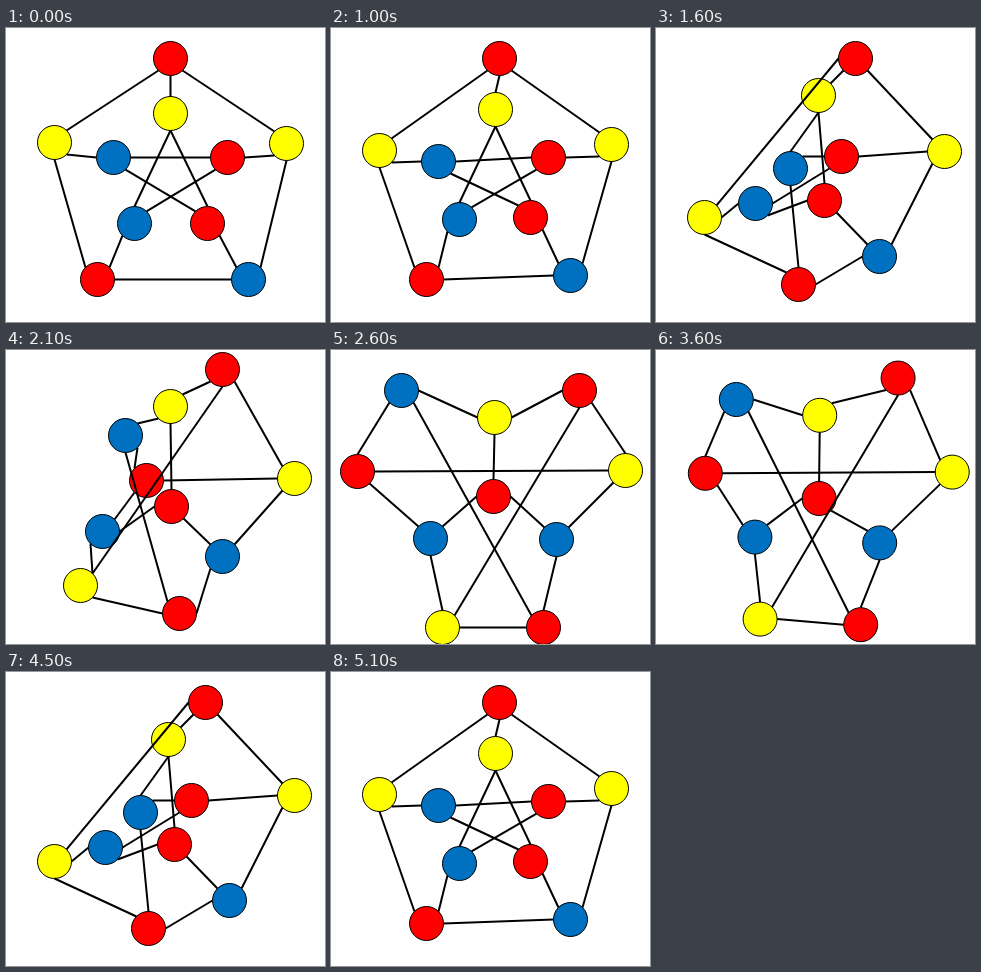
Animation, 319 px wide and 294 px high, one loop 5.2 s. Source, as an HTML page:

```html
<!DOCTYPE html>
<html lang="en">
<head>
<meta charset="utf-8">
<title>Ten-node graph morph</title>
<style>
  html, body { margin: 0; width: 100%; height: 100%; overflow: hidden; background: #fff; }
  svg { display: block; width: 100%; height: 100%; }
  circle { stroke: #000; stroke-width: 1; }
  line { stroke: #000; stroke-width: 2; }
</style>
</head>
<body>
<svg viewBox="0 0 319 294"></svg>
<script>
const RED = '#ff0000', YELLOW = '#ffff00', BLUE = '#0070c0';
const RADIUS = 17, STEP = 100, LOOP = 5200, LAST = 17;

// Steps at which the poses below are reached.
const poseSteps = [0, 1, 7, 12, LAST];

// Node path: x,y per pose; bends bow a path sideways between two poses.
const nodes = {
  top:    { fill: RED,    path: '164,30 168,30 199,30 216,19 248,40', bendY: [0, 0, 0, -14] },
  left:   { fill: YELLOW, path: '48,114 48,122 48,189 74,235 111,277' },
  right:  { fill: YELLOW, path: '280,115 280,116 288,123 288,128 294,120', bendX: [0, -4, 10, 5] },
  footL:  { fill: RED,    path: '91,251 95,251 142,256 173,263 212,277' },
  footR:  { fill: BLUE,   path: '242,251 239,247 223,228 216,206 225,189' },
  inTop:  { fill: YELLOW, path: '164,85 164,81 162,67 164,56 163,67' },
  inLeft: { fill: BLUE,   path: '107,129 107,133 99,175 96,181 99,188' },
  inRight:{ fill: RED,    path: '221,129 217,129 185,128 140,130 26,121' },
  inFootL:{ fill: BLUE,   path: '128,195 128,191 134,140 119,85 70,40' },
  inFootR:{ fill: RED,    path: '201,195 199,189 168,172 165,156 162,146' }
};

// Each edge: its two nodes and, per pose, the rim ports it joins.
// Ports count eighths of a turn clockwise from the right.
const edges = [
  'top left 37 37 47 27 27',
  'top right 15 15 15 15 16',
  'left footL 25 25 25 14 04',
  'right footR 27 27 37 37 37',
  'footL footR 04 04 04 03 62',
  'top inTop 26 26 37 37 40',
  'left inLeft 14 14 04 73 62',
  'right inRight 30 30 40 40 40',
  'footL inFootL 73 73 62 52 51',
  'footR inFootR 51 51 51 51 50',
  'inTop inFootL 26 26 26 37 40',
  'inTop inFootR 26 26 26 26 26',
  'inLeft inRight 04 04 03 73 51',
  'inLeft inFootR 15 15 14 04 74',
  'inRight inFootL 37 37 47 51 63'
].map(text => {
  const [from, to, ...ports] = text.split(' ');
  return { from: nodes[from], to: nodes[to], ports };
});

const svg = document.querySelector('svg');
const add = (tag, attrs = {}) => {
  const el = document.createElementNS(svg.namespaceURI, tag);
  set(el, attrs);
  return svg.appendChild(el);
};
function set(el, attrs) {
  for (const name in attrs) el.setAttribute(name, attrs[name]);
}

for (const node of Object.values(nodes)) {
  node.points = node.path.split(' ').map(p => p.split(',').map(Number));
  node.el = add('circle', { r: RADIUS, fill: node.fill });
}
for (const edge of edges) edge.el = add('line');

function placeNode(node, leg, part) {
  const [a, b] = [node.points[leg], node.points[leg + 1]];
  const bow = Math.sin(Math.PI * part);
  const at = (axis, bend) =>
    a[axis] + (b[axis] - a[axis]) * part + (bend ? bend[leg] * bow : 0) + 0.5;
  node.x = at(0, node.bendX);
  node.y = at(1, node.bendY);
  set(node.el, { cx: node.x, cy: node.y });
}

function port(node, index) {
  const angle = index * Math.PI / 4;
  return [node.x + RADIUS * Math.cos(angle), node.y + RADIUS * Math.sin(angle)];
}

function span(edge, pose) {
  const [i, j] = edge.ports[pose];
  const [x1, y1] = port(edge.from, i), [x2, y2] = port(edge.to, j);
  return { x1, y1, x2, y2 };
}

const length = s => Math.hypot(s.x2 - s.x1, s.y2 - s.y1);

// Between two poses an edge takes the shorter of their two links.
function placeEdge(edge, leg, part) {
  const before = span(edge, leg), after = span(edge, leg + 1);
  const useAfter = part === 1 || (part > 0 && length(after) < length(before));
  set(edge.el, useAfter ? after : before);
}

function draw(step) {
  const leg = Math.max(0, poseSteps.findIndex(s => s >= step) - 1);
  const part = (step - poseSteps[leg]) / (poseSteps[leg + 1] - poseSteps[leg]);
  for (const node of Object.values(nodes)) placeNode(node, leg, part);
  for (const edge of edges) placeEdge(edge, leg, part);
}

const start = performance.now();
function tick() {
  const tickNo = Math.floor((performance.now() - start) % LOOP / STEP);
  draw(Math.max(0, Math.min(tickNo - 9, 52 - tickNo, LAST)));
  requestAnimationFrame(tick);
}
tick();
</script>
</body>
</html>
```
